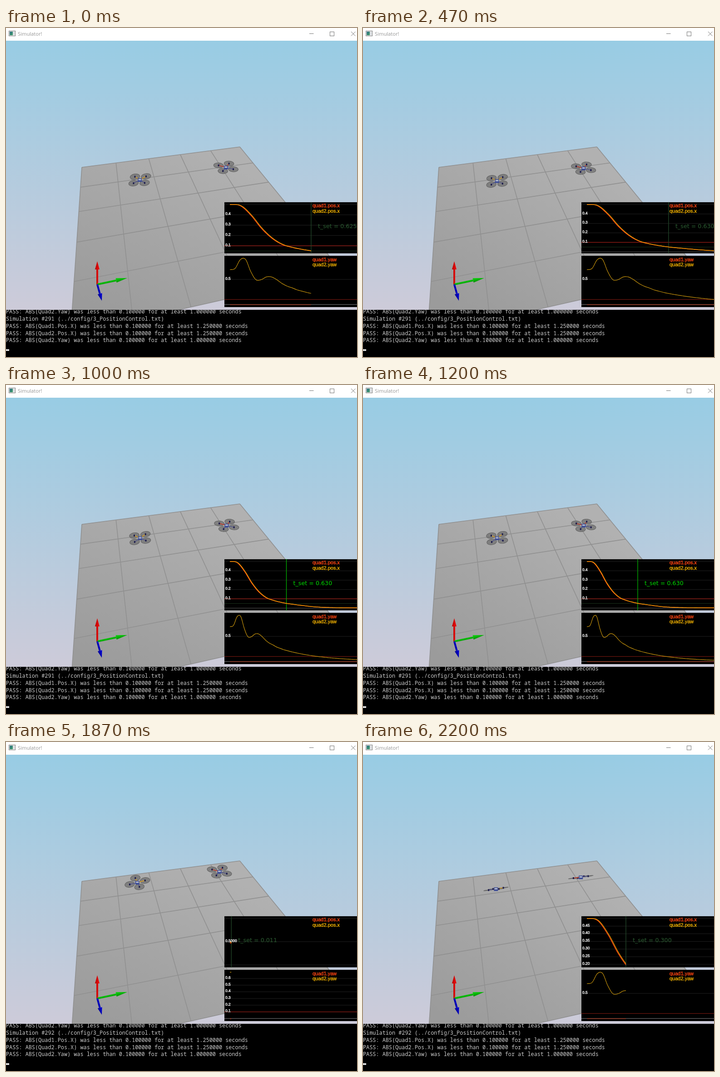
These frames come from a looping animation (773x725 px, 2.27 s). An HTML page with a canvas:

```html
<!DOCTYPE html>
<html lang="en">
<head>
<meta charset="utf-8">
<title>Simulator</title>
<style>
html, body { margin: 0; width: 100%; height: 100%; overflow: hidden; background: #000; }
canvas { display: block; }
</style>
</head>
<body>
<canvas id="stage" width="773" height="725"></canvas>
<script>
const ctx = document.getElementById('stage').getContext('2d');
const LOOP = 2270, RESET = 1866;
const SANS = '"Liberation Sans", Arial, sans-serif';

// Wall clock (ms) to simulated seconds
const CLOCK = [[0, .625], [470, 1.005], [800, 1.288], [1200, 1.611], [1600, 1.77], [RESET, 1.98]];
const RESTART = [[RESET, .01], [2200, .3], [LOOP, .361]];
const POS = [.5, .488, .397, .272, .176, .114, .084, .064, .049, .0385, .029, .02, .013, .009, .0065, .005];
const YAW = [.693, .72, .893, .898, .657, .494, .494, .548, .548, .494, .421, .366, .33, .289, .262, .235, .215];

function lerpTable(table, x) {
  let i = 1;
  while (i < table.length - 1 && x > table[i][0]) i++;
  const [a, p] = table[i - 1], [b, q] = table[i];
  return p + (q - p) * (x - a) / (b - a);
}

// Catmull-Rom through evenly spaced values, exponential decay afterwards
function spline(v, step, decay) {
  const end = (v.length - 1) * step;
  return t => {
    if (t >= end) return v[v.length - 1] * Math.exp(-decay * (t - end));
    const s = Math.max(0, t) / step, i = Math.floor(s), f = s - i;
    const b = v[i], c = v[i + 1], a = v[i - 1] ?? b, d = v[i + 2] ?? c * c / b;
    return b + f / 2 * (c - a + f * (2 * a - 5 * b + 4 * c - d + f * (3 * (b - c) + d - a)));
  };
}
const pos1 = spline(POS, .08, 1.3);
const pos2 = t => pos1(t - .007);
const yaw2 = spline(YAW, .04, 2.25);
const tilt = t => .45 * Math.exp(-(((t - .1) / .055) ** 2)) - .55 * Math.exp(-(((t - .3) / .11) ** 2));

function text(s, x, y, font, color, bold = 0) {
  ctx.font = font;
  ctx.fillStyle = ctx.strokeStyle = color;
  ctx.fillText(s, x, y);
  if (bold) { ctx.lineWidth = bold; ctx.strokeText(s, x, y); }
}

function path(points, color, width = 1, fill) {
  ctx.beginPath();
  points.forEach(p => ctx.lineTo(p[0], p[1]));
  if (fill) { ctx.closePath(); ctx.fillStyle = fill; ctx.fill(); }
  if (color) { ctx.strokeStyle = color; ctx.lineWidth = width; ctx.stroke(); }
}

function rect(x, y, w, h, color) {
  ctx.fillStyle = color;
  ctx.fillRect(x, y, w, h);
}

function gradient(x0, y0, x1, y1, from, to) {
  const g = ctx.createLinearGradient(x0, y0, x1, y1);
  g.addColorStop(0, from);
  g.addColorStop(1, to);
  return g;
}

function titleBar() {
  rect(0, 0, 773, 28, '#fff');
  rect(6, 6, 15, 12, '#777');
  rect(7, 7, 13, 10, '#f4f4f4');
  rect(8, 8, 7, 8, gradient(8, 8, 15, 16, '#2f6f86', '#3d9a63'));
  rect(16, 8, 3, 8, '#d5dade');
  text('Simulator!', 26, 17, '11.2px "Open Sans", sans-serif', '#969696');
  path([[668, 12.5], [677.5, 12.5]], '#777');
  ctx.strokeRect(713.5, 8.5, 9, 9);
  path([[760, 8], [769.5, 17.5]], '#777');
  path([[769.5, 8], [760, 17.5]], '#777');
}

// Perspective map of the unit square onto the floor
function floorPoint(u, v) {
  const w = 1 + .103 * u - .459 * v;
  return [(167 + 401 * u - 90.2 * v) / w, (307 - 18 * u + 58.2 * v) / w];
}

function arrow(x0, y0, x1, y1, head, light, dark) {
  const len = Math.hypot(x1 - x0, y1 - y0);
  ctx.save();
  ctx.translate(x0, y0);
  ctx.rotate(Math.atan2(y1 - y0, x1 - x0));
  const shade = gradient(0, -5, 0, 5, light, dark);
  rect(0, -2, len - head, 4, shade);
  path([[len - head, -5], [len, 0], [len - head, 5]], null, 0, shade);
  ctx.restore();
}

function scene() {
  rect(0, 28, 773, 593, gradient(0, 28, 0, 621, '#98cce4', '#cdcbd9'));
  ctx.save();
  ctx.beginPath();
  ctx.rect(0, 28, 773, 593);
  ctx.clip();
  const edge = [[0, 0], [1, 0], [1, 1], [0, 1]].map(c => floorPoint(...c));
  path(edge, null, 0, gradient(450, 270, 240, 640, '#b1b1b1', '#9b9b9b'));
  for (let i = 0; i <= 5; i++) {
    path([floorPoint(i / 5, 0), floorPoint(i / 5, 1)], '#909090', 1.6);
    path([floorPoint(0, i / 5), floorPoint(1, i / 5)], '#909090', 1.6);
  }
  arrow(201, 565, 201, 514, 18, '#b80000', '#f01010');
  arrow(201, 565, 267, 551, 25, '#10d810', '#009000');
  arrow(201, 565, 211, 601, 16, '#0000e0', '#000090');
  ctx.restore();
}

// side and front are the screen vectors of one arm length; up is 10.4 px
function drone(x, y, side, front, lean, yaw, color) {
  const fx = front[0], fy = front[1] * Math.cos(lean) + 10.4 * Math.sin(lean);
  const at = (p, q) => [p * side[0] + q * fx, p * side[1] + q * fy];
  ctx.save();
  ctx.translate(x, y + 4 * Math.min(0, lean));
  const rotors = [0, 1, 2, 3].map(i => {
    const a = yaw - Math.PI / 4 + i * Math.PI / 2;
    return at(Math.SQRT2 * Math.cos(a), Math.SQRT2 * Math.sin(a));
  });
  for (const r of rotors) {
    const ring = [];
    for (let i = 0; i < 28; i++) {
      const [p, q] = at(.86 * Math.cos(i * Math.PI / 14), .86 * Math.sin(i * Math.PI / 14));
      ring.push([r[0] + p, r[1] + q]);
    }
    ring.push(ring[0]);
    path(ring, '#666', 1.2, 'rgba(100,100,100,.62)');
  }
  rotors.forEach((r, i) => {
    path([[0, 0], r], i % 3 ? '#55598c' : color, 1.6);
    rect(r[0] - 1.5, r[1] - 2, 3, 4, '#1d1d4c');
  });
  rect(-4.5, -3.5, 9, 8, '#3c4c96');
  rect(-3, -2, 6, 3, '#b4bccd');
  ctx.restore();
}

function drones(t) {
  const lean = tilt(t), p1 = pos1(t), p2 = pos2(t);
  drone(295.3 - 12 * p2, 337.5 - 56 * p2, [12.3, -1.7], [.8, 7], lean, .85 * yaw2(t), '#d39a22');
  drone(486 - 32 * p1, 309.5 - 48 * p1, [11.5, -2], [4.75, 6.2], lean, 0, '#c8402c');
}

function panel(top, lo, hi, t, draw) {
  const scale = 286 / Math.max(1, t);
  const px = s => 493.2 + s * scale;
  const py = v => top + 5.3 + (hi - v) / (hi - lo) * 102;
  const level = (v, color, width = 1, from = 481) => path([[from, py(v)], [773, py(v)]], color, width);
  const curve = (f, color, width) => {
    const pts = [];
    const end = Math.min(t, 280 / scale);
    for (let i = 0; i <= 150; i++) pts.push([px(end * i / 150), py(f(end * i / 150))]);
    path(pts, color, width);
  };
  ctx.save();
  ctx.beginPath();
  ctx.rect(481, top, 292, 113);
  ctx.clip();
  rect(481, top, 292, 113, '#000');

  const range = hi - lo;
  let step = 1e-4;
  for (let k = 0; range / step > 7; k++) step *= k % 2 ? 2 : 5;
  const digits = step < .009 ? 4 : step < .09 ? 2 : 1;
  const labels = [];
  for (let i = Math.ceil(lo / step - 1e-6); i * step <= hi + 1e-6; i++) {
    const y = py(i * step);
    level(i * step, '#202020');
    if (i > 0 && y > top + 12 && y < top + 106.5) labels.push([(i * step).toFixed(digits), y + .7]);
  }
  draw(px, py, level, curve);
  labels.forEach(([s, y]) => text(s, 483, y, '8.4px ' + SANS, '#eee', .5));
  ctx.restore();
}

function legend(name, y) {
  text('quad1.' + name, 675, y, '11px ' + SANS, '#ff4512', .4);
  text('quad2.' + name, 675, y + 11.7, '11px ' + SANS, '#f0b000', .4);
}

function posPanel(t) {
  let lo = pos1(t), hi = .5;
  if (hi - lo < .0015) { lo = .495; hi = .505; }
  panel(383.7, lo, hi, t, (px, py, level, curve) => {
    const set = Math.min(t, .63), x = px(set), settled = t > 1.13;
    level(0, '#555');
    level(.05, '#1c331c');
    level(.1, '#9c1c14', 1.2);
    path([[x, 383], [x, 497]], settled ? '#00b400' : '#23482a', 1.3);
    curve(pos1, '#ff4a10', 1.5);
    curve(pos2, '#eda000', 1.3);
    if (t > 1.677) {
      const left = px(.427);
      path([[773, py(.1)], [left, py(.1)], [left, 495.5], [773, 495.5]], '#00c800', 1.6);
    }
    text('t_set = ' + set.toFixed(3), x + 15, 440.7, '12.7px "DejaVu Sans", sans-serif', settled ? '#00d800' : '#2b5c31');
    legend('pos.x', 395);
  });
}

function yawPanel(t) {
  let hi = .69;
  for (let s = 0; s <= Math.min(t, .2); s += .005) hi = Math.max(hi, yaw2(s));
  panel(502, 0, hi, t, (px, py, level, curve) => {
    level(0, '#777');
    level(.1, '#8c1c14', 1.2);
    curve(() => -.004, '#c43a1c', 1.2);
    curve(yaw2, '#c8940c', 1.2);
    legend('yaw', 513.5);
  });
}

function terminal(run) {
  rect(0, 621, 773, 104, '#000');
  ctx.save();
  ctx.beginPath();
  ctx.rect(0, 621, 773, 104);
  ctx.clip();
  const pass = (what, secs) => `PASS: ABS(${what}) was less than 0.100000 for at least ${secs} seconds`;
  [
    pass('Quad2.Yaw', '1.000000'),
    `Simulation #${run} (../config/3_PositionControl.txt)`,
    pass('Quad1.Pos.X', '1.250000'),
    pass('Quad2.Pos.X', '1.250000'),
    pass('Quad2.Yaw', '1.000000')
  ].forEach((s, i) => text(s, 0, 629.2 + 15.8 * i, '11.85px "Noto Sans Mono", monospace', '#ccc'));
  rect(0, 708, 7, 3.5, '#eee');
  ctx.restore();
}

// Screen updates 15 times a second, with one update dropped
function tick(ms) {
  let k = Math.floor(ms * .015 + .06);
  if (Math.round(k * 20 / 3) * 10 > ms) k--;
  if (k === 19) k = 18;
  return k * 200 / 3;
}

function frame() {
  const ms = tick(performance.now() % LOOP);
  const again = ms >= RESET;
  const t = lerpTable(again ? RESTART : CLOCK, ms);
  titleBar();
  scene();
  drones(t);
  posPanel(t);
  yawPanel(t);
  terminal(again ? 292 : 291);
  requestAnimationFrame(frame);
}
frame();
</script>
</body>
</html>
```
